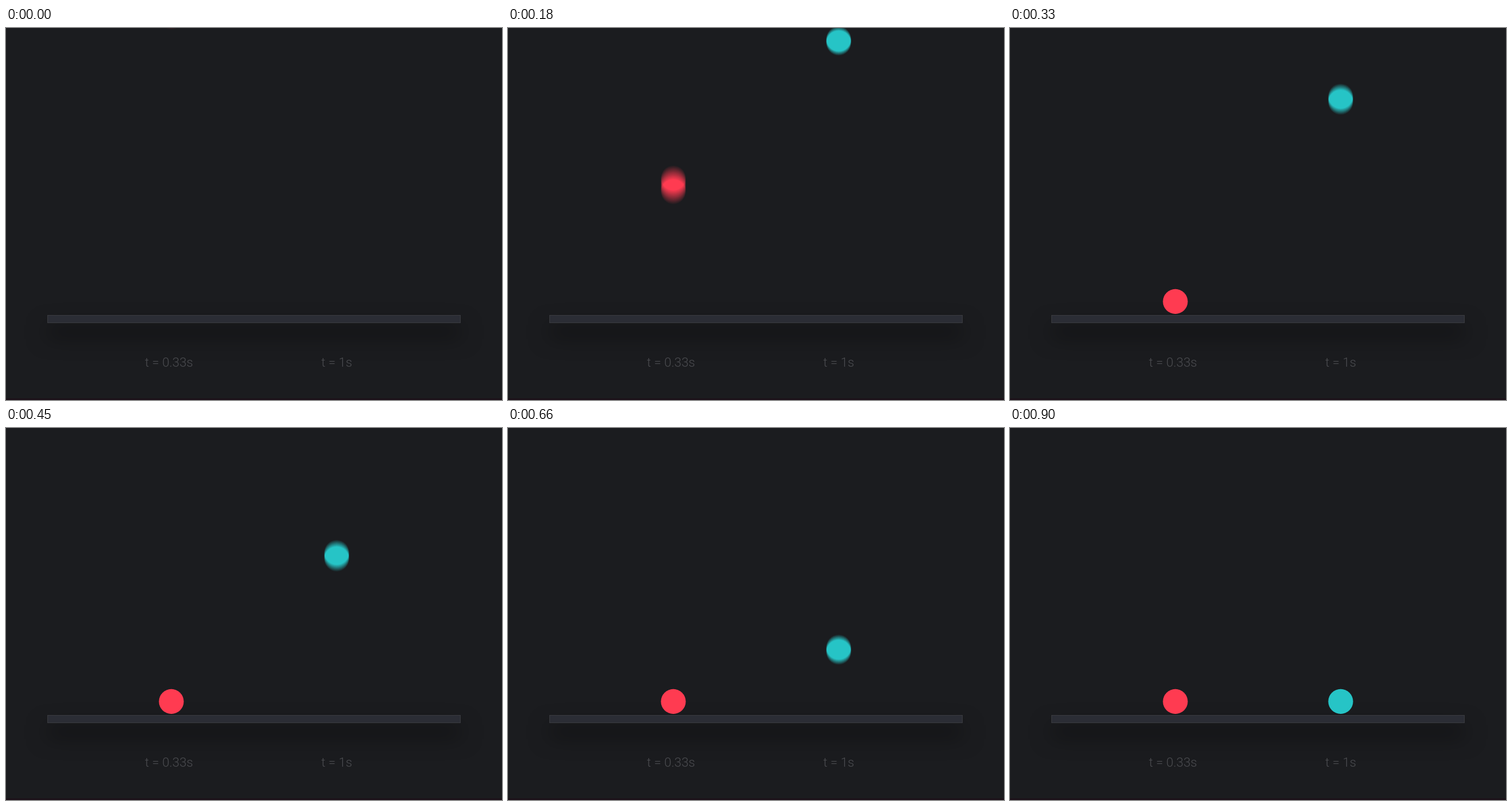
An HTML page with a canvas that plays this animation: 864 px wide and 648 px high, repeating every 1650 ms.

```html
<!DOCTYPE html>
<html lang="en">
<head>
<meta charset="utf-8">
<style>
  html, body { margin: 0; height: 100%; overflow: hidden; background: #1b1c1f; }
  .bar {
    position: absolute; left: 72px; top: 500px; width: 720px; height: 14px;
    box-sizing: border-box; background: #2b2d35; border: 1px solid #3a3b40;
    box-shadow: 0 22px 36px rgba(0, 0, 0, .56);
  }
  .edge { position: absolute; left: 0; top: 645px; width: 864px; height: 3px; background: #1c1219; }
  canvas, svg { position: absolute; left: 0; top: 0; }
  text { font: 300 22.2px Roboto, "Liberation Sans", sans-serif; fill: #4b4c50; }
</style>
</head>
<body>
<div class="bar"></div>
<div class="edge"></div>
<svg width="864" height="648">
  <text x="242" y="590">t = 0.33s</text>
  <text x="549.3" y="590">t = 1s</text>
</svg>
<canvas id="stage" width="864" height="648"></canvas>
<script>
const LOOP = 1650, STEP = 30, SHUTTER = STEP / 2, SAMPLES = 15;
const TOP = -31.6, FLOOR = 476.4, RADIUS = 21.6;

const linear = u => u;
const smooth = u => 0.025 * u + 0.975 * u * u * (3 - 2 * u);
const balls = [
  { x: 288, color: "#ff3b51", time: 300, ease: linear },
  { x: 576, color: "#26c4c6", time: 900, ease: smooth }
];

const ctx = stage.getContext("2d");
const layer = document.createElement("canvas");
layer.width = 864;
layer.height = 648;
const mask = layer.getContext("2d");

function height(ball, t) {
  const u = Math.min(1, Math.max(0, t / ball.time));
  return TOP + (FLOOR - TOP) * ball.ease(u);
}

// Motion blur: average the ball over the open shutter, then tint the mask.
function drawBall(ball, t) {
  mask.globalCompositeOperation = "source-over";
  mask.clearRect(0, 0, 864, 648);
  mask.globalCompositeOperation = "lighter";
  mask.globalAlpha = 1 / SAMPLES;
  mask.fillStyle = "#fff";
  for (let i = 0; i < SAMPLES; i++) {
    const y = height(ball, t + SHUTTER * ((i + 0.5) / SAMPLES - 0.5));
    mask.beginPath();
    mask.arc(ball.x, y, RADIUS, 0, 2 * Math.PI);
    mask.fill();
  }
  mask.globalAlpha = 1;
  mask.globalCompositeOperation = "source-in";
  mask.fillStyle = ball.color;
  mask.fillRect(0, 0, 864, 648);
  ctx.drawImage(layer, 0, 0);
}

const start = performance.now();
function draw() {
  const t = Math.floor((performance.now() - start) % LOOP / STEP) * STEP;
  ctx.clearRect(0, 0, 864, 648);
  for (const ball of balls) drawBall(ball, t);
  requestAnimationFrame(draw);
}
draw();
</script>
</body>
</html>
```
